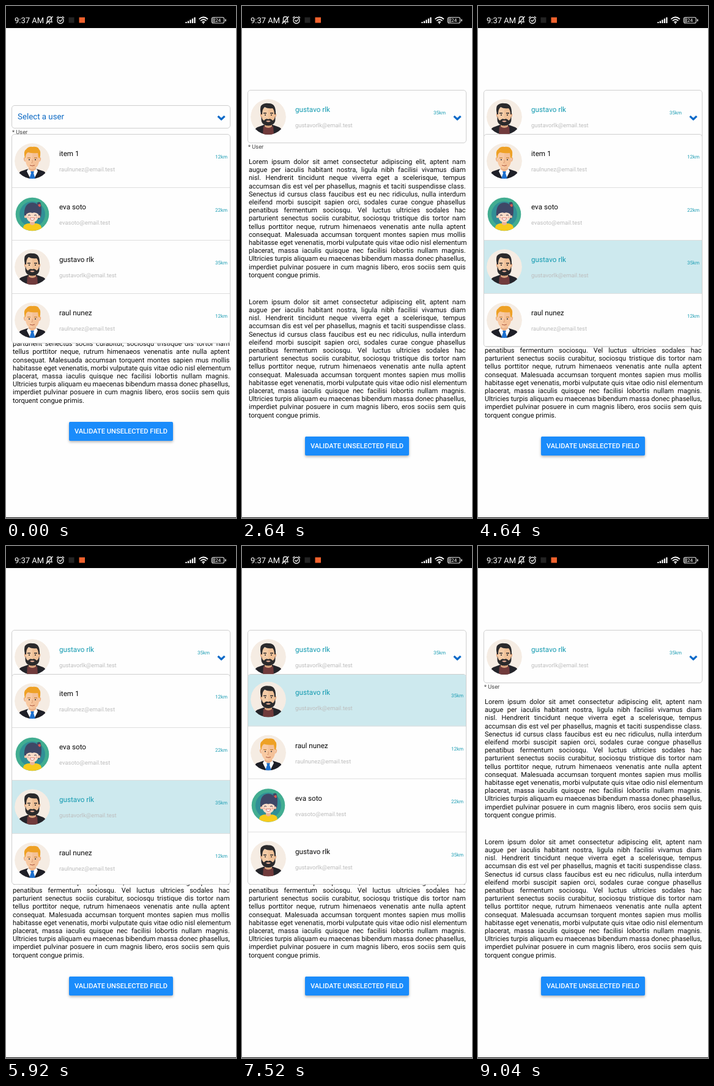
An HTML page for the animation above (9120 ms loop, 376 by 836 pixels).

```html
<!DOCTYPE html>
<html lang="en">
<head>
<meta charset="utf-8">
<title>User dropdown</title>
<style>
  html, body { margin: 0; width: 100%; height: 100%; overflow: hidden; background: #fff; }
  body { font-family: Roboto, "Open Sans", sans-serif; color: #0a0a0a; text-rendering: geometricPrecision; }
  #stage { position: relative; width: 376px; height: 836px; overflow: hidden; background: #fefefe; }
  #stage * { box-sizing: border-box; }
  #stage div, #stage svg { position: absolute; }
  svg { overflow: visible; }

  .bar { left: 0; top: 0; }
  .foot { left: 0; top: 835px; width: 376px; height: 1px; background: #111; }

  .box { left: 9px; width: 358px; background: #fefefe; border: 1px solid #cfcfcf; border-radius: 5px; }
  .empty { top: 162px; height: 38px; animation: before 9120ms step-end infinite; }
  .chosen { top: 137px; height: 87px; animation: after 9120ms step-end infinite; }
  .prompt { left: 9px; top: 9px; font-size: 13.3px; line-height: 20px; color: #0b69c4; white-space: nowrap; }
  .chev { left: 335px; }

  .page { left: 0; top: 0; width: 376px; height: 836px; animation: shift 9120ms step-end infinite; }
  .label { left: 10px; top: 221px; font-size: 9.3px; line-height: 20px; color: #444; white-space: nowrap; }
  .para { left: 11px; width: 354.6px; font-size: 11.07px; }
  .para div { left: 0; width: 100%; line-height: 13.2px; white-space: nowrap; text-align: justify; text-align-last: justify; }
  .para div:last-child { text-align-last: left; }
  .button { left: 103px; top: 703px; width: 170px; height: 31px; border-radius: 2px; background: #1a8cfb;
    box-shadow: 0 2px 4px rgba(0, 0, 0, .3); color: #fff; font-size: 11.1px; font-weight: 500;
    line-height: 32px; text-align: center; white-space: nowrap; }

  .menu { top: 209px; height: 344px; overflow: hidden;
    animation: fade 9120ms linear infinite, grow 9120ms linear infinite; }
  .list { left: 0; top: 0; width: 356px; height: 519px; animation: scroll 9120ms step-end infinite; }
  .row { left: 0; width: 356px; height: 86.5px; border-bottom: 1px solid #dedede; }
  .item { left: 0; top: 0; width: 356px; height: 86px; }
  .face { left: 4px; top: 14px; width: 58px; height: 58px; }
  .name, .mail, .dist { line-height: 20px; white-space: nowrap; }
  .name { left: 77px; top: 21px; font-size: 11.7px; }
  .mail { left: 77px; top: 48px; font-size: 9.45px; color: #bdbdbd; }
  .dist { right: 4px; top: 27px; font-size: 8px; color: #1c9db3; }
  .chosen .name { color: #129ab0; }
  .chosen .dist { right: 33px; }

  .row.picked { animation: tint 9120ms step-end infinite; }
  .picked .name { animation: ink 9120ms step-end infinite; }
  .picked .item { animation: tap 9120ms linear infinite; }
  .touched .item { animation: touch 9120ms linear infinite; }

  @keyframes before { 0% { visibility: visible } 24.56%, 100% { visibility: hidden } }
  @keyframes after { 0% { visibility: hidden } 24.56%, 100% { visibility: visible } }
  @keyframes shift { 0% { transform: translateY(-24px) } 24.56%, 100% { transform: none } }
  @keyframes tint { 0% { background: #fefefe } 24.56%, 100% { background: #cde9ee } }
  @keyframes ink { 0% { color: #0a0a0a } 24.56%, 100% { color: #129ab0 } }
  @keyframes tap { 0%, 22.37% { opacity: 1 } 23.68%, 24.5% { opacity: .25 } 25.5%, 100% { opacity: 1 } }
  @keyframes touch { 0%, 71.05% { opacity: 1 } 72.8%, 73.9% { opacity: .25 } 77%, 100% { opacity: 1 } }
  @keyframes fade {
    0%, 24.56% { opacity: 1 } 27.2%, 46.49% { opacity: 0 }
    49.5%, 95.6% { opacity: 1 } 98.2%, 100% { opacity: 0 }
  }
  @keyframes grow {
    0%, 27.2% { height: 342px } 27.3%, 52% { height: 347.5px } 53.5%, 100% { height: 344px }
  }
  /* drag, then a fling that slows down at the end of the list */
  @keyframes scroll {
    0% { transform: none }
    73.67% { transform: translateY(-20px) }
    74.55% { transform: translateY(-56px) }
    75.43% { transform: translateY(-92px) }
    76.3% { transform: translateY(-121px) }
    77.18% { transform: translateY(-143px) }
    78.06% { transform: translateY(-158px) }
    78.93% { transform: translateY(-168px) }
    79.81% { transform: translateY(-173px) }
    80.69%, 100% { transform: translateY(-175.5px) }
  }
</style>
</head>
<body>
<div id="stage">
  <svg width="0" height="0">
    <defs>
      <clipPath id="disc"><circle r="29"/></clipPath>
      <symbol id="blond" viewBox="-29 -29 58 58">
        <g clip-path="url(#disc)">
          <circle r="29" fill="#f5ece3"/>
          <path d="M-6 6h12v13h-12z" fill="#e9b189"/>
          <path d="M-23 29q0-10 4-12l12-4 7 8 7-8 12 4q4 2 4 12z" fill="#1e1f27"/>
          <path d="M-7 13l7 5 7-5 2 4-6 12h-6l-6-12z" fill="#fff"/>
          <path d="M-3 17h6l-1 3 3 9h-10l3-9z" fill="#1d70cf"/>
          <path d="M-12-6q-3 0-2 4t3 3zM12-6q3 0 2 4t-3 3z" fill="#efb68d"/>
          <path d="M-11-14h22v14q-1 9-7 12-4 2-8 0-6-3-7-12z" fill="#f8c9a2"/>
          <path d="M0-14h11v14q-1 9-7 12-2 1-4 1z" fill="#f4c198"/>
          <path d="M-12-4q-3-13 2-15 4-5 10-4 9-1 11 4 4 3 1 15l-2-2-1-7q-9 1-16-1-4 2-4 8z" fill="#eea125"/>
          <path d="M-8-5h5M3-5h5" stroke="#b97524" stroke-width="1.2"/>
          <circle cx="-5" cy="-2" r="1.1" fill="#33363d"/><circle cx="5" cy="-2" r="1.1" fill="#33363d"/>
          <path d="M0-2v5h-2" fill="none" stroke="#d99a70"/>
          <path d="M-4 7q4 2 8 0" fill="none" stroke="#a8553f"/>
        </g>
      </symbol>
      <symbol id="beard" viewBox="-29 -29 58 58">
        <g clip-path="url(#disc)">
          <circle r="29" fill="#f5ece3"/>
          <path d="M-23 29q0-10 5-12l11-4h14l11 4q5 2 5 12z" fill="#24242a"/>
          <path d="M-8 15q8 5 16 0l1 14h-18z" fill="#713b3c"/>
          <path d="M-6 8h12v8q-6 4-12 0z" fill="#dca47e"/>
          <path d="M-11-6q-3 0-2 4t3 4zM11-6q3 0 2 4t-3 4z" fill="#e5ad86"/>
          <path d="M-11-15h22v17l-4 8h-14l-4-8z" fill="#f3cba6"/>
          <path d="M0-15h11v17l-4 8h-7z" fill="#efc198"/>
          <path d="M-12-4q-2-10 0-14 5-5 12-4 13-1 12 18h-2q0-7-3-10-8 1-13-2-4 3-4 12z" fill="#2b2a2c"/>
          <path d="M-11-1q1 6 4 7 3-4 7-2 4-2 7 2 3-1 4-7 2 9-3 13-8 5-16 0-5-4-3-13z" fill="#2b2a2c"/>
          <path d="M-4 7q4-2 8 0-4 3-8 0z" fill="#e9b199"/>
          <path d="M-8-6h5M3-6h5" stroke="#2b2a2c" stroke-width="1.3"/>
          <circle cx="-5" cy="-3" r="1" fill="#222"/><circle cx="5" cy="-3" r="1" fill="#222"/>
        </g>
      </symbol>
      <symbol id="girl" viewBox="-29 -29 58 58">
        <circle r="27.3" fill="#42ad91"/>
        <circle r="21" fill="#318f96"/>
        <path d="M8-19q5-3 6 2 2 10 0 21l-4 5q-2-14-2-28z" fill="#3f4766"/>
        <path d="M8-15l5-2 1 4-5 2z" fill="#d95a52"/>
        <path d="M-15 23q0-7 8-8h14q8 1 8 8-7 4-15 4t-15-4z" fill="#f8cb1c"/>
        <path d="M-4 10h8v6q-4 4-8 0z" fill="#edb596"/>
        <path d="M-13 4q-2-22 13-23 15 1 13 23-4 4-13 4t-13-4z" fill="#3f4766"/>
        <circle cx="-11" cy="4" r="2.2" fill="#f4c4a8"/><circle cx="11" cy="4" r="2.2" fill="#f4c4a8"/>
        <path d="M-10 0q5-4 10-2 5-2 10 2v4q-2 9-10 9t-10-9z" fill="#fbdcc8"/>
        <path d="M-7 2q2-2 4 0M3 2q2-2 4 0" fill="none" stroke="#34364a"/>
        <path d="M-4 6h8q-1 4-4 4t-4-4z" fill="#fff" stroke="#c95650" stroke-width=".8"/>
        <circle cx="-7" cy="5" r="1.4" fill="#f4b3a5"/><circle cx="7" cy="5" r="1.4" fill="#f4b3a5"/>
      </symbol>
      <symbol id="chev" viewBox="0 0 14 10"><path d="M1.500 1.800L7 7l5.500-5.200" fill="none" stroke="#0b69c8" stroke-width="3.200" stroke-linejoin="round"/></symbol>
    </defs>
  </svg>

  <div class="page">
    <div class="label">* User</div>
    <div class="para" style="top:247.9px"></div>
    <div class="para" style="top:476.7px"></div>
    <div class="button">VALIDATE UNSELECTED FIELD</div>
  </div>

  <div class="box empty">
    <div class="prompt">Select a user</div>
    <svg class="chev" style="top:15px" width="14" height="10"><use href="#chev"/></svg>
  </div>
  <div class="box chosen">
    <svg class="chev" style="top:40px" width="14" height="10"><use href="#chev"/></svg>
  </div>
  <div class="box menu"><div class="list"></div></div>

  <svg class="bar" width="376" height="36" fill="none" stroke="#eee" stroke-width="1.3">
    <path d="M0 0h376v36h-376z" fill="#000" stroke="none"/>
    <text x="14" y="28" font-size="13" fill="#fff" stroke="none">9:37 AM</text>
    <path d="M66 26h10M67.500 25v-4q0-3.500 3.500-3.500t3.500 3.500v4M70 28.500h2M65.500 29L76.500 17"/>
    <circle cx="89" cy="23.500" r="5"/>
    <path d="M86.500 23l2 2 3.500-3M83 19.500l3-2.500M95 19.500l-3-2.500"/>
    <path d="M102.500 18.500h9v9h-9z" fill="#242424" stroke="none"/>
    <path d="M119.500 18.500h9.500v9h-9.500z" fill="#f0622d" stroke="none"/>
    <path d="M294.500 28v-2M298 28v-3.500M301.500 28v-5.500M305 28v-7.500M308.500 28v-9.500" stroke="#fff" stroke-width="2.200"/>
    <path d="M315.500 21.500q7-6.500 14.500 0M318 24.200q5-4 9.500 0M320.500 26.700q2.500-1.700 4.500 0" stroke="#fff" stroke-width="1.700"/>
    <circle cx="322.700" cy="28.300" r="1" fill="#fff" stroke="none"/>
    <rect x="336.500" y="18.500" width="20" height="9.500" rx="2.500" stroke="#ddd" stroke-width="1.200"/>
    <path d="M337.500 19.500h4.500v7.500h-4.500z" fill="#777" stroke="none"/>
    <path d="M359 21.500v3.500" stroke-width="1.600"/>
    <text x="346.700" y="26.200" font-size="8" text-anchor="middle" fill="#fff" stroke="none">24</text>
  </svg>
  <div class="foot"></div>
</div>

<script>
  const lorem = `Lorem ipsum dolor sit amet consectetur adipiscing elit, aptent nam
augue per iaculis habitant nostra, ligula nibh facilisi vivamus diam
nisl. Hendrerit tincidunt neque viverra eget a scelerisque, tempus
accumsan dis est vel per phasellus, magnis et taciti suspendisse class.
Senectus id cursus class faucibus est eu nec ridiculus, nulla interdum
eleifend morbi suscipit sapien orci, sodales curae congue phasellus
penatibus fermentum sociosqu. Vel luctus ultricies sodales hac
parturient senectus sociis curabitur, sociosqu tristique dis tortor nam
tellus porttitor neque, rutrum himenaeos venenatis ante nulla aptent
consequat. Malesuada accumsan torquent montes sapien mus mollis
habitasse eget venenatis, morbi vulputate quis vitae odio nisl elementum
placerat, massa iaculis quisque nec facilisi lobortis nullam magnis.
Ultricies turpis aliquam eu maecenas bibendum massa donec phasellus,
imperdiet pulvinar posuere in cum magnis libero, eros sociis sem quis
torquent congue primis.`.split("\n");

  const raul = { name: "raul nunez", mail: "raulnunez", dist: 12, face: "blond" };
  const eva = { name: "eva soto", mail: "evasoto", dist: 22, face: "girl" };
  const gus = { name: "gustavo rlk", mail: "gustavorlk", dist: 35, face: "beard" };
  const users = [{ ...raul, name: "item 1" }, eva, gus, raul, eva, gus];

  const item = u => `<div class="item">
    <svg class="face"><use href="#${u.face}" width="58" height="58"/></svg>
    <div class="name">${u.name}</div>
    <div class="mail">${u.mail}@email.test</div>
    <div class="dist">${u.dist}km</div></div>`;

  const state = { 2: "picked", 3: "touched" };
  document.querySelector(".list").innerHTML = users.map((u, i) =>
    `<div class="row ${state[i] || ""}" style="top:${i * 86.5}px">${item(u)}</div>`).join("");
  document.querySelector(".chosen").insertAdjacentHTML("afterbegin", item(gus));
  for (const p of document.querySelectorAll(".para"))
    p.innerHTML = lorem.map((s, i) => `<div style="top:${(i * 13.21).toFixed(2)}px">${s}</div>`).join("");
</script>
</body>
</html>
```
